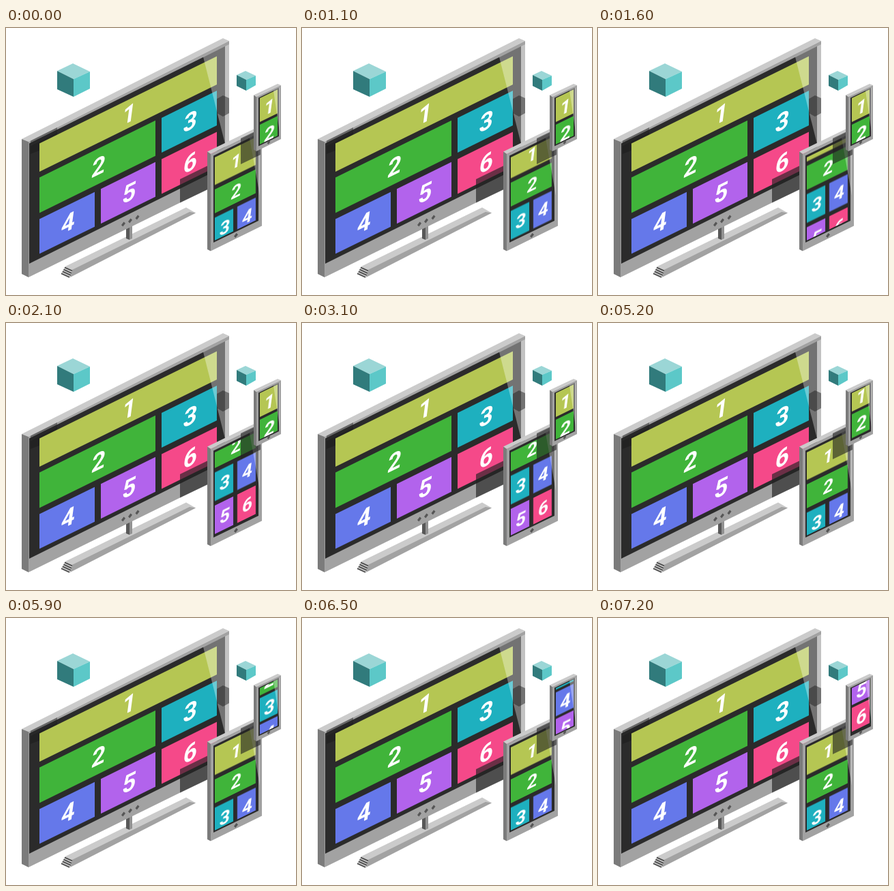
Recreate the animation shown at these times as an HTML page. Size 425 by 392 pixels, loop 8 s.

```html
<!DOCTYPE html>
<html lang="en">
<head>
<meta charset="utf-8">
<title>Responsive blocks on three screens</title>
<style>
  html, body { margin: 0; width: 100%; height: 100%; overflow: hidden; background: #fff; }
  svg { display: block; width: 425px; height: 392px; }
  text { font: 700 27px Roboto, "Open Sans", sans-serif; fill: #fff; text-anchor: middle; }
  #tv text { font-size: 35px; }
  #tablet text { font-size: 26px; }

  .top { fill: #cbcbcb; }
  .front { fill: #a2a2a2; }
  .side { fill: #7b7b7b; }
  .screen { fill: #2b2b2b; }
  .knob { fill: #565656; }
  .shade { fill: #222; opacity: .65; }
  .glare { fill: #fff; opacity: .34; }
  .c-top { fill: #9bd6d6; }
  .c-left { fill: #317b7c; }
  .c-right { fill: #5cc8c8; }

  #tablet { animation: tablet 8s infinite; }
  #phone { animation: phone 8s infinite; }
  @keyframes tablet {
    0% { transform: translateY(0); }
    12.5% { transform: translateY(0); animation-timing-function: steps(12, start); }
    27.5% { transform: translateY(-59px); }
    38.75% { transform: translateY(-59px); animation-timing-function: steps(12, start); }
    53.75%, 100% { transform: translateY(0); }
  }
  @keyframes phone {
    0% { transform: translateY(0); }
    65% { transform: translateY(0); animation-timing-function: steps(21, start); }
    91.25%, 100% { transform: translateY(-166px); }
  }
</style>
</head>
<body>
<svg viewBox="0 0 425 392">
  <defs>
    <clipPath id="tabletClip"><rect width="60" height="122"/></clipPath>
    <clipPath id="phoneClip"><rect width="26" height="68"/></clipPath>
    <path id="knob" d="M-3 1.2L.6-3.4L3-1.2L-.6 3.4Z"/>
  </defs>

  <!-- cubes -->
  <path class="c-top" d="M75 63L98 52L123 64L99 75Z"/>
  <path class="c-left" d="M75 63L99 75V101L75 90Z"/>
  <path class="c-right" d="M99 75L123 64V89L99 101Z"/>
  <path class="c-top" d="M338 69L351 63L366 70L352 76Z"/>
  <path class="c-left" d="M338 69L352 76V92L338 85Z"/>
  <path class="c-right" d="M352 76L366 70V84L352 92Z"/>

  <!-- stand -->
  <path class="top" d="M87 350L264 263.500L278 271.500L97 356Z"/>
  <path class="front" d="M97 355L269 270L278 271.500L94 366Z"/>
  <path d="M87 350L97 355L94 366L81 360Z" fill="#c4c4c4"/>
  <path d="M86 351.500L97 356.500M84.500 354.500L96 360M83 357.500L95 363M81 360.500L93 366" stroke="#454545" stroke-width="1.500"/>
  <path d="M176 288H181V311L176 309Z" fill="#585858"/>
  <path d="M181 288H185V309L181 311Z" fill="#929292"/>

  <!-- television -->
  <path class="top" d="M23 163L318 15L327 19L33 167Z"/>
  <path class="side" d="M23 163L33 167V366L23 361Z"/>
  <path class="front" d="M33 167L327 19V221L33 366Z"/>
  <path class="screen" d="M34 169.500L321 27V203L34 346Z"/>
  <path class="shade" d="M36 165.500L75 146V153L36 172Z" style="opacity:.45"/>
  <path d="M36 173L75 153V157L49 169.500V180L36 185Z" fill="#000" opacity=".2"/>
  <g id="tv" transform="matrix(1 -.492 0 1 49 169.500)"></g>
  <path class="glare" d="M289 42.500L327 24V182L321 170Z"/>
  <path class="shade" d="M309 104L318 99L327 103V125L318 130L309 125Z" style="opacity:.5"/>
  <path class="shade" d="M255 222L298 201V236L255 256.500Z"/>
  <use href="#knob" class="knob" x="172" y="288"/>
  <use href="#knob" class="knob" x="182" y="283"/>
  <use href="#knob" class="knob" x="192.500" y="278"/>

  <!-- tablet -->
  <path class="top" d="M295 181.500L370 145L375 148L300 185Z"/>
  <path class="side" d="M295 181.500L300 185V327.500L295 325Z"/>
  <path class="front" d="M300 185L375 148V290.500L300 327.500Z"/>
  <path class="screen" d="M304 187.500L370 155V283L304 315Z"/>
  <g transform="matrix(1 -.492 0 1 306 190)" clip-path="url(#tabletClip)"><g id="tablet"></g></g>
  <path class="glare" d="M357 161.500L372 154V246Z"/>
  <path class="shade" d="M344 162L373 148V186L344 200Z" style="opacity:.6"/>
  <use href="#knob" class="knob" x="337" y="304.500"/>

  <!-- phone -->
  <path class="top" d="M363 98.500L398 82L403 84L367 101Z"/>
  <path class="side" d="M363 98.500L367 101V181L363 178.500Z"/>
  <path class="front" d="M367 101L403 84V163L367 181Z"/>
  <path class="screen" d="M370 102.500L400 88V159L370 173.500Z"/>
  <g transform="matrix(1 -.492 0 1 372 103)" clip-path="url(#phoneClip)"><g id="phone"></g></g>
  <path class="glare" d="M392 92L401 87.500V153Z"/>
  <use href="#knob" class="knob" transform="translate(385 168) scale(.8)"/>
</svg>

<script>
  const colors = ["#b5c653", "#40b43a", "#1eb0bf", "#6578ea", "#b263ec", "#f54989"];
  const ns = "http://www.w3.org/2000/svg";

  function add(parent, tag, attrs) {
    const el = parent.appendChild(document.createElementNS(ns, tag));
    for (const key in attrs) el.setAttribute(key, attrs[key]);
    return el;
  }

  // Each block is [x, y, width, height]; its number follows from its position in the list.
  function fill(id, size, drop, blocks) {
    const group = document.getElementById(id);
    blocks.forEach(([x, y, width, height], i) => {
      add(group, "rect", { x, y, width, height, fill: colors[i] });
      const cx = x + width / 2, cy = y + height / 2 + drop + size * .355;
      add(group, "text", { transform: `translate(${cx} ${cy}) skewX(-8)` }).textContent = i + 1;
    });
  }

  fill("tv", 35, 0, [
    [0, 0, 260, 41.5], [0, 50, 170, 52], [179, 50.5, 81, 51],
    [0, 111, 81, 51], [90, 111, 80, 51], [179, 111, 81, 51]
  ]);
  fill("tablet", 26, .5, [
    [0, 0, 60, 40.5], [0, 47, 60, 35], [0, 88.5, 27, 42],
    [33, 88.5, 27, 42], [0, 137, 27, 42], [33, 137, 27, 42]
  ]);
  fill("phone", 27, 2, colors.map((c, i) => [0, i * 39, 26, 35]));
</script>
</body>
</html>
```
